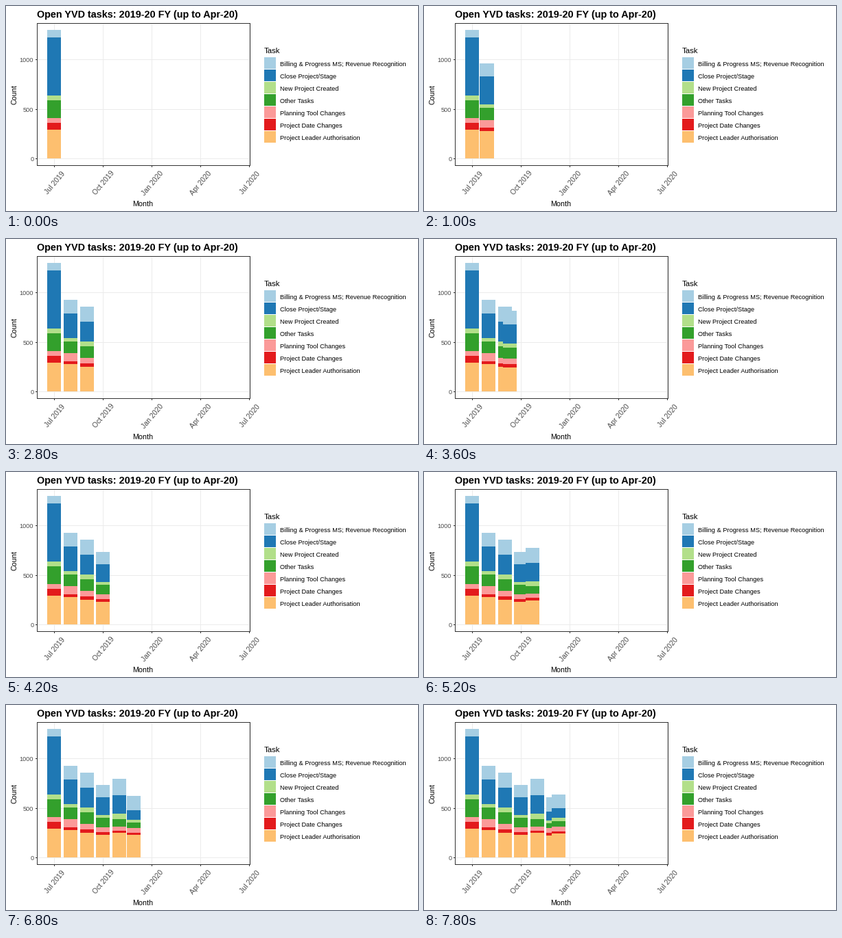
A matplotlib script for the animation above (8000 ms loop, 600 by 300 pixels).

```python
import numpy as np
import matplotlib.pyplot as plt
from matplotlib.animation import FuncAnimation
from matplotlib.patches import Rectangle

W, H, DPI = 600, 300, 100
FRAMES, STEP_MS = 40, 200

# Plot scales, in pixels
X0, PX_PER_DAY = 69.75, 0.776
Y0, PX_PER_COUNT = 223.2, 0.1448
HALF_BAR = 10.1
LEFT, TOP, RIGHT, BOTTOM = 45, 25, 355, 233
TICK = 2

GRID, DARK, GREY = "#ebebeb", "#333333", "#4d4d4d"

TASKS = [
    ("Billing & Progress MS; Revenue Recognition", "#a6cee3"),
    ("Close Project/Stage", "#1f78b4"),
    ("New Project Created", "#b2df8a"),
    ("Other Tasks", "#33a02c"),
    ("Planning Tool Changes", "#fb9a99"),
    ("Project Date Changes", "#e31a1c"),
    ("Project Leader Authorisation", "#fdbf6f"),
]

# One row per month from July, stacked from the bottom up
COUNTS = np.array([
    [293, 69, 48, 179, 48, 584, 79],
    [279, 28, 82, 117, 35, 247, 138],
    [252, 34, 55, 117, 48, 200, 151],
    [231, 28, 48, 96, 27, 179, 124],
    [252, 20, 42, 72, 58, 186, 165],
    [224, 24, 52, 48, 28, 89, 144],
    [280, 14, 50, 71, 47, 111, 125],
])
DAYS = np.array([0, 31, 62, 92, 123, 153, 184])
STARTS = [0, 7, 15, 22, 29, 36, 43]  # step at which each month is reached

plt.rcParams["font.family"] = "Liberation Sans"
fig = plt.figure(figsize=(W / DPI, H / DPI), dpi=DPI, facecolor="white")
ax = fig.add_axes([0, 0, 1, 1])
ax.set_xlim(0, W)
ax.set_ylim(H, 0)
ax.axis("off")


def box(x, y, w, h, color, z=1):
    patch = Rectangle((x, y), w, h, facecolor=color, linewidth=0,
                      antialiased=False, zorder=z)
    return ax.add_patch(patch)


def label(x, y, text, px, color="black", **kw):
    kw.setdefault("va", "baseline")
    ax.text(x, y, text, fontsize=px * 72 / DPI, color=color, **kw)


def make_stack(z):
    return [box(0, 0, 0, 0, color, z) for _, color in reversed(TASKS)]


def place_stack(stack, day, counts):
    x = X0 + day * PX_PER_DAY
    edges = Y0 - PX_PER_COUNT * np.concatenate([[0], np.cumsum(counts)])
    for patch, low, high in zip(stack, edges[:-1], edges[1:]):
        patch.set_bounds(x - HALF_BAR, high, 2 * HALF_BAR, low - high)


def cubic_in_out(t):
    return 4 * t ** 3 if t < 0.5 else 1 - 4 * (1 - t) ** 3


def draw_axes():
    for y, text in [(223, "0"), (151, "500"), (78, "1000")]:
        box(LEFT, y, RIGHT - LEFT, 1, GRID)
        box(LEFT - TICK, y, TICK, 1, DARK)
        label(40.3, y + 4.3, text, 9.2, GREY, ha="right")
    dates = ["Jul 2019", "Oct 2019", "Jan 2020", "Apr 2020", "Jul 2020"]
    for x, text in zip([70, 141, 212, 283, 354], dates):
        box(x, TOP, 1, BOTTOM - TOP, GRID)
        box(x, BOTTOM + 1, 1, TICK, DARK)
        label(x + 1.3, 259.2, text, 10.5, GREY, ha="center", va="center",
              rotation=50)
    for x in (LEFT, RIGHT):
        box(x, TOP, 1, BOTTOM - TOP + 1, DARK, 9)
    for y in (TOP, BOTTOM):
        box(LEFT, y, RIGHT - LEFT + 1, 1, DARK, 9)
    label(45, 17, "Open YVD tasks: 2019-20 FY (up to Apr-20)", 14.45,
          weight="bold")
    label(199.5, 293, "Month", 10.7, ha="center")
    label(12.3, 129.5, "Count", 10.7, ha="center", va="center", rotation=90)


def draw_legend():
    label(376, 69, "Task", 11.4)
    for i, (name, color) in enumerate(TASKS):
        y = 75 + 18 * i
        box(376, y, 17, 17, color)
        label(399, y + 13, name, 9.3)


draw_axes()
draw_legend()
past = [make_stack(3) for _ in STARTS[:-1]]
for stack, day, counts in zip(past, DAYS, COUNTS):
    place_stack(stack, day, counts)
mover = make_stack(5)


def update(frame):
    month = max(i for i, start in enumerate(STARTS) if start <= frame)
    start, end = STARTS[month:month + 2]
    p = cubic_in_out((frame - start) / (end - start))
    for i, stack in enumerate(past):
        for patch in stack:
            patch.set_visible(i <= month)
    place_stack(mover,
                DAYS[month] + p * (DAYS[month + 1] - DAYS[month]),
                COUNTS[month] + p * (COUNTS[month + 1] - COUNTS[month]))
    return mover


anim = FuncAnimation(fig, update, frames=FRAMES, interval=STEP_MS,
                     repeat=True, repeat_delay=0, blit=False)
plt.show()
```
